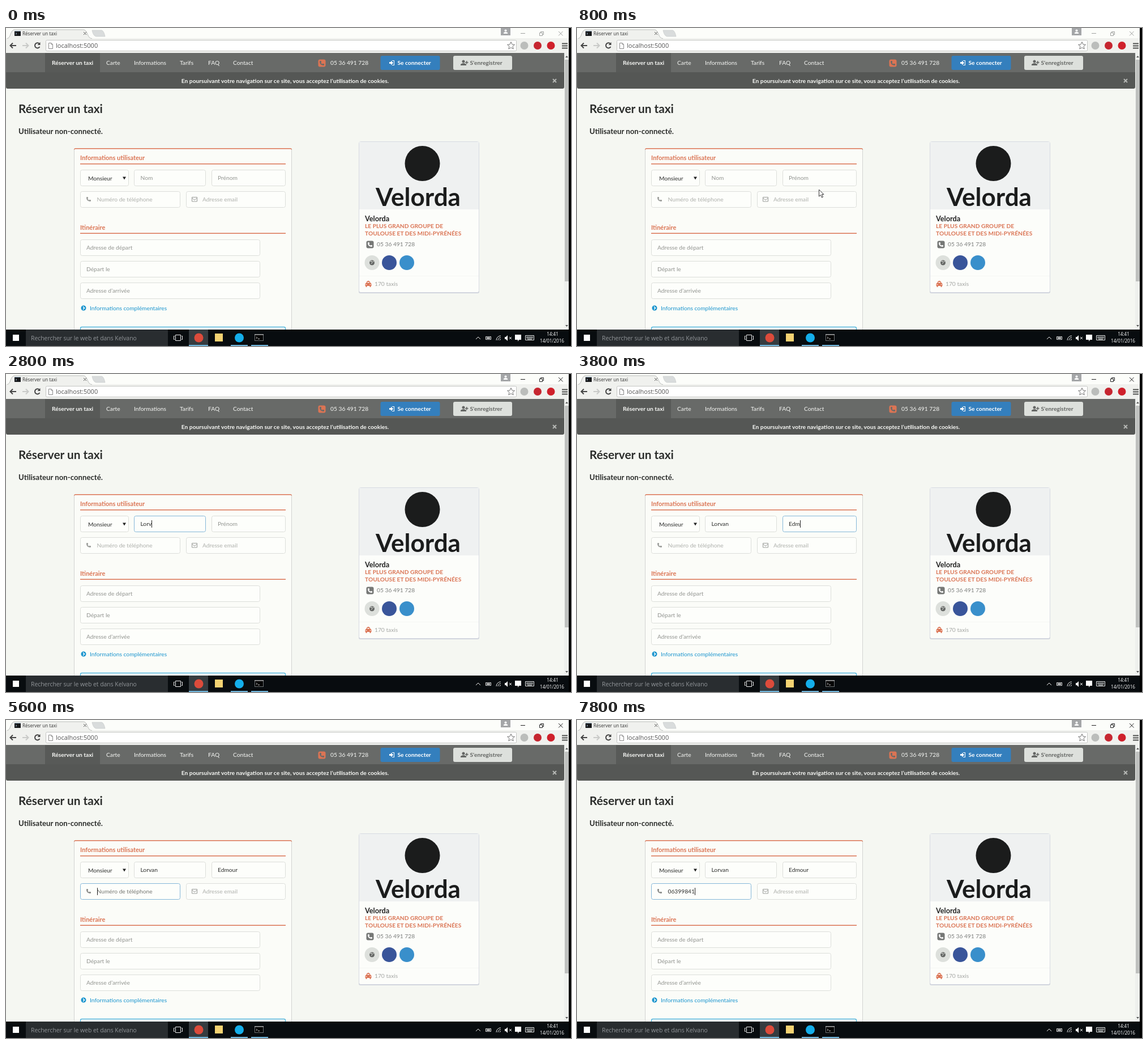
Write an HTML page that moves like this. It is 998x561 px and loops after 8 s.

```html
<!DOCTYPE html>
<html lang="fr">
<head>
<meta charset="utf-8">
<title>Réserver un taxi</title>
<style>
  html, body { margin: 0; height: 100%; overflow: hidden; background: #000; }
  svg { display: block; width: 100vw; height: 100vh; font: 10.23px Lato, sans-serif; }
  .bold { font-weight: 700; }
  .ui { font-family: "Open Sans", sans-serif; }
  .orange { fill: #db7454; }
  .field rect { fill: #fdfefb; stroke: #dcdeda; }
  .field.focus rect { stroke: #85b7d9; }
  .field text { fill: #929490; }
  .field.faint text { fill: #aeb0ac; }
  .field.focus text { fill: #747672; }
  .field.filled text { fill: #2c2d2c; }
  .field use { fill: #9a9c99; }
  .field.focus use { fill: #868886; }
  .line { fill: none !important; stroke: currentColor; }
</style>
</head>
<body>
<svg viewBox="0 0 998 561" preserveAspectRatio="none">
  <defs>
    <path id="handset" d="M1 0H3L4 3 2.7 4.2Q3.8 6.4 5.9 7.3L7 6 10 7V9Q9.5 10 8 10 0 9 0 2 0 .5 1 0Z"/>
    <path id="cab" d="M3 3.5 4 1H5V0H8V1H9L10 3.5Q12 4 12 6V9H11V11H9V9H4V11H2V9H1V6Q1 4 3 3.5ZM4.3 3.5H8.7L8 2H5ZM2 6V7H4V6ZM9 6V7H11V6Z" fill-rule="evenodd"/>
  </defs>

  <!-- Browser window -->
  <rect width="994" height="44" fill="#fcfdfa"/>
  <rect y="18" width="994" height="26" fill="#f0f1ee"/>
  <path d="M2 18.5Q6 18 8 11T14 3H137Q141 3 144 11T152 18.5" fill="#f0f1ee" stroke="#b9bbb9"/>
  <path d="M152 4H169Q173 5 175 15H159Q154 14 152 4Z" fill="#d9dcdc" stroke="#c3c6c6" stroke-width=".6"/>
  <rect x="15" y="5" width="11" height="9" fill="#17191b"/>
  <path d="M15 5.5H26M17 8.5 19 10 17 11.5" class="line" color="#9ab0c4"/>
  <text x="29" y="12.5" class="ui" font-size="8.1" fill="#333">Réserver un taxi</text>
  <path d="M137 7 142 12M142 7 137 12" class="line" color="#555"/>
  <rect x="874" width="17" height="13" fill="#a4a6a8"/>
  <path d="M879 10V8Q882.5 6 886 8V10Z" fill="#fff"/><circle cx="882.5" cy="4.5" r="2" fill="#fff"/>
  <path id="controls" d="M909 9.5H917M942.5 8.5H947.5V13.5H942.5ZM944.5 8V6.5H949.5V11.5H948M976 6 983.5 13.5M983.5 6 976 13.5" class="line"/>
  <g stroke-width="2">
    <path d="M18 31H8M12 26.5 7.5 31 12 35.5" class="line" color="#444"/>
    <path d="M29 31H39M35 26.5 39.5 31 35 35.5" class="line" color="#c9cac8"/>
    <path d="M59 28A4.5 4.5 0 1 0 59.5 33" class="line" color="#444"/>
    <path d="M60.5 25V30H55.5Z" fill="#444"/>
    <path d="M982 27.5H992M982 31.5H992M982 35.5H992" class="line" color="#505250"/>
  </g>
  <rect x="70.5" y="21.5" width="831" height="19" rx="2" fill="#fff" stroke="#c3c5c2"/>
  <path d="M75.5 26.5H80L82.5 29V36.5H75.5ZM80 26.5V29H82.5" class="line" color="#888"/>
  <text x="88" y="35" class="ui" font-size="11" fill="#555">localhost:5000</text>
  <path d="M892 24.5 894 29 898.5 29.3 895 32.3 896.2 37 892 34.5 887.8 37 889 32.3 885.5 29.3 890 29Z" class="line" color="#777"/>
  <circle cx="915.5" cy="31" r="7" fill="#bbbdbb"/>
  <circle cx="939" cy="31" r="7" fill="#c62630"/>
  <circle cx="962.5" cy="31" r="7" fill="#cf202b"/>

  <!-- Page -->
  <rect y="44" width="986" height="488" fill="#f5f7f2"/>
  <rect y="44" width="986" height="34" fill="#686a68"/>
  <rect x="69" y="44" width="97" height="34" fill="#585a58"/>
  <path d="M0 78H986V104Q986 107 983 107H3Q0 107 0 104Z" fill="#555755"/>
  <g fill="#f7f8f5">
    <text x="81" y="65" class="bold">Réserver un taxi</text>
    <text x="177" y="65">Carte</text>
    <text x="226" y="65">Informations</text>
    <text x="307" y="65">Tarifs</text>
    <text x="357" y="65">FAQ</text>
    <text x="401" y="65">Contact</text>
    <text x="573" y="65">05 36 491 728</text>
    <text x="493" y="96.5" text-anchor="middle" class="bold">En poursuivant votre navigation sur ce site, vous acceptez l’utilisation de cookies.</text>
  </g>
  <path d="M966 90 972 96M972 90 966 96" class="line" color="#b5b7b4" stroke-width="2"/>
  <rect x="551.5" y="55.5" width="13" height="13" rx="3" class="orange"/>
  <use href="#handset" transform="translate(554 58) scale(.8)" fill="#686a68"/>
  <rect x="661.5" y="49" width="105" height="25" rx="3" fill="#347fbd"/>
  <path d="M677 60H680V57.5L684 61.5 680 65.5V63H677ZM682 57H686V66H682V65H685V58H682Z" fill="#fff"/>
  <text x="691.5" y="65" class="bold" fill="#fff">Se connecter</text>
  <rect x="790" y="49" width="104" height="25" rx="3" fill="#dde0dc"/>
  <g fill="#646664">
    <circle cx="808" cy="59" r="2.5"/><path d="M803 66V64Q808 60 813 64V66ZM811 60H813V58H814.5V60H816.5V61.5H814.5V63.5H813V61.5H811Z"/>
    <text x="819.5" y="65" class="bold">S'enregistrer</text>
  </g>
  <rect x="986" y="44" width="8" height="488" fill="#eef0ed"/>
  <rect x="987" y="56" width="7" height="391" fill="#bfc1bf"/>
  <path d="M988 52 990.5 49 993 52ZM988 524 990.5 527 993 524Z" fill="#555"/>

  <g class="bold" fill="#2b2d2b">
    <text x="22" y="149.5" font-size="20.8">Réserver un taxi</text>
    <text x="22" y="187" font-size="13.2">Utilisateur non-connecté.</text>
  </g>

  <!-- Booking form -->
  <path d="M120.5 532V215Q120.5 212.5 123 212.5H502Q504.5 212.5 504.5 215V532" fill="#fbfcf8" stroke="#d2d4d1"/>
  <path d="M120 215Q120 212 123 212H502Q505 212 505 215L503 213.5H122Z" class="orange"/>
  <g class="orange bold" font-size="10.95">
    <text x="131" y="233">Informations utilisateur</text>
    <text x="131" y="356">Itinéraire</text>
    <path d="M131 239H494V240.5H131ZM131 361.5H494V363H131Z"/>
  </g>
  <g class="field filled"><rect x="131.5" y="250.5" width="85" height="28" rx="3"/>
    <text x="145" y="268.5">Monsieur</text><path d="M206 262.5H212L209 267.5Z" fill="#222"/></g>
  <g id="lastName" class="field"><rect x="226.5" y="250.5" width="126" height="28" rx="3"/><text x="237.5" y="268">Nom</text></g>
  <g id="firstName" class="field"><rect x="363.5" y="250.5" width="130" height="28" rx="3"/><text x="374" y="268">Prénom</text></g>
  <g id="phone" class="field faint"><rect x="131.5" y="288.5" width="176" height="28" rx="3"/><text x="160.5" y="306">Numéro de téléphone</text>
    <use href="#handset" transform="translate(142 298) scale(.8)"/></g>
  <g class="field faint"><rect x="318.5" y="288.5" width="175" height="28" rx="3"/><text x="347" y="306">Adresse email</text>
    <path d="M328.5 298.5H337.5V306H328.5ZM328.5 300 333 303.5 337.5 300" class="line" color="#999b98"/></g>
  <g class="field"><rect x="131.5" y="373.5" width="317" height="28" rx="3"/><text x="142" y="391">Adresse de départ</text></g>
  <g class="field"><rect x="131.5" y="411.5" width="317" height="28" rx="3"/><text x="142" y="429">Départ le</text></g>
  <g class="field"><rect x="131.5" y="449.5" width="317" height="28" rx="3"/><text x="142" y="467">Adresse d’arrivée</text></g>
  <g fill="#1b95ce">
    <circle cx="137" cy="494" r="4.5"/><path d="M136 491.5 138.5 494 136 496.5" class="line" color="#fff" stroke-width="1.5"/>
    <text x="148" y="497.5">Informations complémentaires</text>
  </g>
  <path d="M131.5 532V530Q131.5 527.5 134 527.5H491Q493.5 527.5 493.5 530V532" fill="#f7fbfa" stroke="#58b9de" stroke-width="1.5"/>

  <!-- Company card -->
  <rect x="623" y="202" width="213" height="266" rx="3" fill="#ccd0da"/>
  <rect x="623.5" y="200.5" width="212" height="266" rx="3" fill="#fcfdfa" stroke="#d7dae2"/>
  <rect x="624" y="201" width="211" height="119" fill="#eff1f1"/>
  <circle cx="735.5" cy="239" r="31" fill="#1b1c1c"/>
  <text x="728" y="314" text-anchor="middle" class="bold" font-size="44" fill="#1b1c1c">Velorda</text>
  <text x="634" y="340.5" font-size="12.7" fill="#222" class="bold">Velorda</text>
  <g class="orange bold">
    <text x="634" y="352.5">LE PLUS GRAND GROUPE DE</text>
    <text x="634" y="366">TOULOUSE ET DES MIDI-PYRÉNÉES</text>
  </g>
  <rect x="636.5" y="375.5" width="13" height="13" rx="3" fill="#767876"/>
  <use href="#handset" transform="translate(639 378) scale(.8)" fill="#fff"/>
  <text x="655" y="384.5" fill="#7c7e7c">05 36 491 728</text>
  <circle cx="646.5" cy="414" r="13" fill="#dde0dc"/>
  <circle cx="646.5" cy="414" r="4.5" fill="#666866"/>
  <path d="M643 412 646 411 647 414 645 416M648 411 650 413" class="line" color="#dde0dc"/>
  <circle cx="677" cy="414" r="13" fill="#39559a"/>
  <circle cx="708" cy="414" r="13" fill="#398fcb"/>
  <path d="M624 437.5H835" class="line" color="#f5f6f3"/>
  <use href="#cab" x="633.5" y="446" class="orange"/>
  <text x="651" y="455" fill="#a5a7a4">170 taxis</text>

  <!-- Taskbar -->
  <rect y="532" width="994" height="29" fill="#080c0f"/>
  <rect x="35" y="532" width="251" height="29" fill="#292d30"/>
  <rect x="12" y="541" width="11" height="11" fill="#fff"/>
  <text x="44" y="551" class="ui" font-size="10.4" fill="#92969a">Rechercher sur le web et dans Kelvano</text>
  <path d="M299.5 541.5H308.5V551.5H299.5ZM298 543.5H296.5V549.5H298M310 543.5H311.5V549.5H310" class="line" color="#eee"/>
  <rect x="323" y="532" width="34" height="29" fill="#363c40"/>
  <circle cx="340.5" cy="546.5" r="8" fill="#dc4b3b"/>
  <rect x="369" y="539" width="14" height="14" fill="#f4d272"/>
  <circle cx="412" cy="546.5" r="8" fill="#14aeea"/>
  <rect x="439.5" y="540.5" width="15" height="11" fill="#050505" stroke="#6e7274"/>
  <path d="M439 541H455M442 545 444 546.5 442 548M445 548.5H448" class="line" color="#ccc"/>
  <path d="M323 559H357V561H323ZM397 559H427V561H397ZM433 559H463V561H433Z" fill="#6eb4dc"/>
  <path d="M830 549 834 545 838 549M847.5 544.5H856.5V549.5H847.5ZM866 551A8 8 0 0 1 874 543M869 551A5 5 0 0 1 874 546M872 551A2 2 0 0 1 874 549M889 545 893 549M893 545 889 549M917.5 542.5H932.5V550.5H917.5ZM919 545H931M919 547H931M921 549H929" class="line" color="#e6e8e8"/>
  <path d="M849 546H855V548H849ZM881 545H883L886 542V552L883 549H881ZM899 541H910V550H906L904 553V550H899Z" fill="#fff"/>
  <g class="ui" font-size="8.1" fill="#fff" text-anchor="middle">
    <text x="965.5" y="542.5">14:41</text>
    <text x="964.5" y="555">14/01/2016</text>
  </g>

  <rect id="caret" width="1" height="13" fill="#222"/>
  <path id="arrow" d="M0 0V12L3 9.5 5 14 7 13 5 8.5H8.5Z" fill="#fff" stroke="#222" stroke-width=".9"/>
  <path id="beam" d="M-2-6H2M0-6V6M-2 6H2" class="line" color="#222"/>
</svg>
<script>
  const LOOP = 8000, STEP = 200, CLICK = 1600;
  const el = id => document.getElementById(id);
  const show = (node, visible) => node.setAttribute('visibility', visible ? 'visible' : 'hidden');

  // Each field: focus period, typed value and the time of every keystroke.
  const fields = [
    { id: 'lastName', from: CLICK, to: 3200, value: 'Lorvan', keys: [2200, 2400, 2600, 2800, 3000, 3000] },
    { id: 'firstName', from: 3200, to: 4400, value: 'Edmour', keys: [3400, 3600, 3800, 4000, 4200, 4200] },
    { id: 'phone', from: 4400, to: LOOP, value: '06399841', keys: [5800, 6000, 6200, 6400, 6800, 7000, 7400, 7800] },
  ];
  for (const field of fields) {
    field.node = el(field.id);
    field.text = field.node.querySelector('text');
    field.hint = field.text.textContent;
  }

  function drawField(field, t) {
    const pressed = field.keys.filter(k => k <= t);
    const focused = t >= field.from && t < field.to;
    const typed = field.value.slice(0, pressed.length);
    field.text.textContent = typed || field.hint;
    field.node.classList.toggle('filled', typed !== '');
    field.node.classList.toggle('focus', focused);
    if (!focused) return;

    const width = typed ? field.text.getComputedTextLength() : 0;
    const lastAction = pressed.at(-1) ?? field.from;
    const caret = el('caret');
    caret.setAttribute('x', Math.round(+field.text.getAttribute('x') + width));
    caret.setAttribute('y', field.text.getAttribute('y') - 10);
    show(caret, (t - lastAction) % 1000 < 500);
  }

  function drawPointer(t) {
    const p = Math.min(1, Math.max(0, (t - STEP) / 1000));
    const ease = p * p * (3 - 2 * p);
    const x = 594 - 257 * ease, y = 335 - 77 * ease;
    const overField = x > 226 && x < 353 && y > 250 && y < 278;
    const visible = t >= STEP && t < 1800;
    for (const id of ['arrow', 'beam']) {
      el(id).setAttribute('transform', `translate(${x} ${y})`);
      show(el(id), visible && overField === (id === 'beam'));
    }
  }

  function draw() {
    const t = Math.floor(performance.now() % LOOP / STEP) * STEP;
    el('controls').setAttribute('color', t < CLICK ? '#a0a2a0' : '#222');
    show(el('caret'), false);
    fields.forEach(field => drawField(field, t));
    drawPointer(t);
    requestAnimationFrame(draw);
  }
  draw();
</script>
</body>
</html>
```
